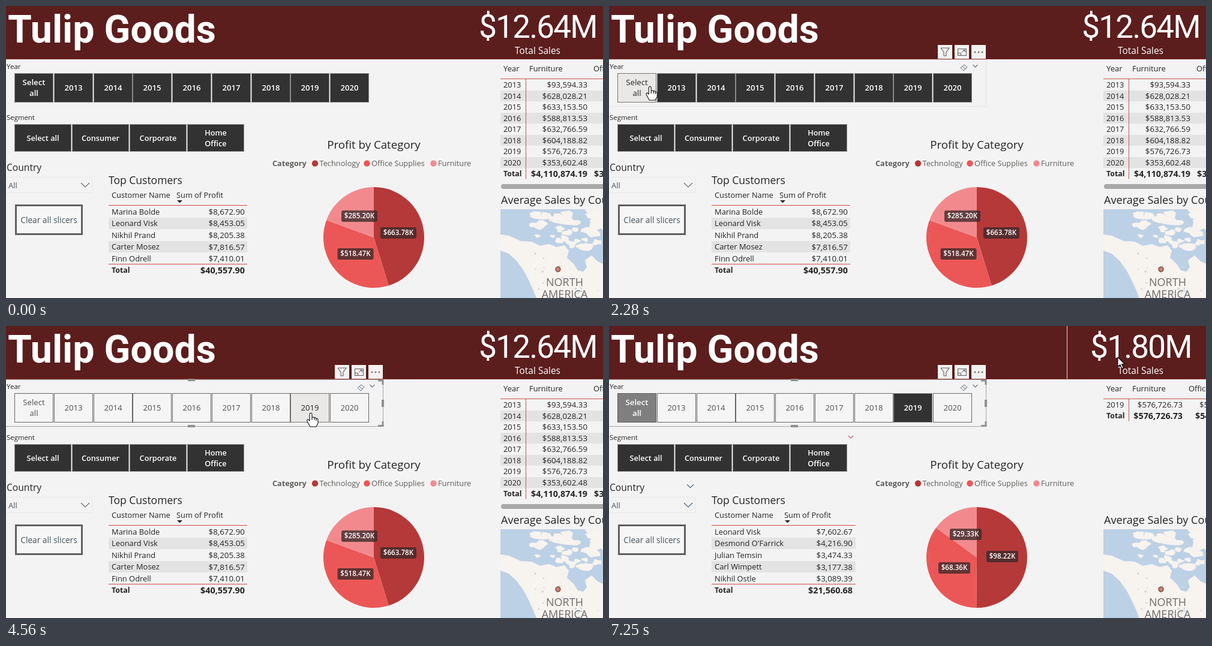
An HTML page with a canvas for the animation above (8000 ms loop, 995 px wide and 487 px high).

```html
<!DOCTYPE html>
<html lang="en">
<head>
<meta charset="utf-8">
<title>Sales dashboard</title>
<style>
html, body { margin: 0; width: 100%; height: 100%; overflow: hidden; background: #f3f3f3; }
canvas { display: block; }
</style>
</head>
<body>
<canvas id="stage" width="995" height="487"></canvas>
<script>
const ctx = document.getElementById('stage').getContext('2d');
const LOOP = 8000, CLEARED = 2950, PICKED = 4840, FILTERED = 5040, SETTLED = 5180;
const RED = '#cf4a42', INK = '#252423', GREY = '#605e5c';
const PIE = ['#b53939', '#eb5757', '#f28a8d'];

const all = {
  card: '$12.64M', sumX: 284, right: 398, edge: 402,
  people: [['Marina Bolde', '$8,672.90'], ['Leonard Visk', '$8,453.05'], ['Nikhil Prand', '$8,205.38'],
    ['Carter Mosez', '$7,816.57'], ['Finn Odrell', '$7,410.01']],
  total: '$40,557.90',
  pie: [663.78, 518.47, 285.2],
  chips: [['$663.78K', 654, 378.5], ['$518.47K', 582.5, 413.5], ['$285.20K', 589, 350.5]],
  years: [['2013', '$93,594.33'], ['2014', '$628,028.21'], ['2015', '$633,153.50'], ['2016', '$588,813.53'],
    ['2017', '$632,766.59'], ['2018', '$604,188.82'], ['2019', '$576,726.73'], ['2020', '$353,602.48']],
  sales: '$4,110,874.19', salesX: 969, nextX: 979, next: ['', '$3']
};
const picked = {
  card: '$1.80M', sumX: 292, right: 406, edge: 411,
  people: [['Leonard Visk', '$7,602.67'], ["Desmond O'Farrick", '$4,216.90'], ['Julian Temsin', '$3,474.33'],
    ['Carl Wimpett', '$3,177.38'], ['Nikhil Ostle', '$3,089.39']],
  total: '$21,560.68',
  pie: [98.22, 68.36, 29.33],
  chips: [['$98.22K', 655.5, 384.5], ['$68.36K', 575.5, 403.5], ['$29.33K', 594.5, 347.5]],
  years: [['2019', '$576,726.73']],
  sales: '$576,726.73', salesX: 956, nextX: 966, next: ['$5', '$54']
};

// Pointer hot spot: time, x, y
const path = [[590, 596, 484], [810, 571, 424], [1100, 520, 320], [1390, 462, 246], [1460, 445, 238],
  [1700, 340, 205], [1940, 236, 173], [2220, 76, 134], [2280, 68, 134], [2430, 108, 136], [2610, 58, 138],
  [3410, 58, 138], [3480, 59, 138], [3750, 250, 190], [3980, 460, 229], [4280, 512, 160],
  [4560, 508, 145], [5110, 506, 145], [6180, 506, 145], [6350, 570, 164], [6600, 720, 110], [6910, 848, 52]];

function pointer(t) {
  const i = path.findIndex(p => p[0] > t);
  if (i === 0) return [-99, -99];
  if (i < 0) return path.at(-1).slice(1);
  const [a, b] = [path[i - 1], path[i]], k = (t - a[0]) / (b[0] - a[0]);
  return [a[1] + (b[1] - a[1]) * k, a[2] + (b[2] - a[2]) * k];
}

const inside = ([x, y], l, t, r, b) => x >= l && x <= r && y >= t && y <= b;

// y is the middle of the capitals
function text(s, x, y, size, color = INK, align = 'left', weight = 400, family = '"Open Sans", "Noto Sans"') {
  ctx.font = `${weight} ${size}px ${family}, sans-serif`;
  ctx.textAlign = align;
  ctx.fillStyle = color;
  ctx.fillText(s, x, y + size * 0.357);
}

function rect(x, y, w, h, color) {
  ctx.fillStyle = color;
  ctx.fillRect(x, y, w, h);
}

function frame(x, y, w, h, color, width = 1) {
  ctx.strokeStyle = color;
  ctx.lineWidth = width;
  ctx.strokeRect(x + width / 2, y + width / 2, w - width, h - width);
}

function line(color, width, ...pts) {
  ctx.strokeStyle = color;
  ctx.lineWidth = width;
  ctx.beginPath();
  for (let i = 0; i < pts.length; i += 2) ctx.lineTo(pts[i], pts[i + 1]);
  ctx.stroke();
}

function dot(x, y, r, color) {
  ctx.fillStyle = color;
  ctx.beginPath();
  ctx.arc(x, y, r, 0, 7);
  ctx.fill();
}

const chevron = (x, y, w, color) => line(color, 1.1, x - w, y - w / 2, x, y + w / 2, x + w, y - w / 2);

function button(label, x, y, w, h, state) {
  const [fill, edge, ink, weight] = {
    on: ['#323232', '#8a8a8a', '#fff', 600],
    part: ['#7f7f7f', '#606060', '#fff', 600],
    off: ['#f5f5f5', '#666', '#4f4f4f', 400],
    hover: ['#e9e8e6', '#777', '#252525', 400]
  }[state];
  rect(x, y, w, h, fill);
  frame(x, y, w, h, edge);
  const rows = label.split('\n'), size = h > 47 ? 13.2 : 12.7;
  rows.forEach((s, i) => text(s, x + w / 2, y + h / 2 + (i - (rows.length - 1) / 2) * 18, size, ink, 'center', weight));
}

function tools(x, y) {
  for (let i = 0; i < 3; i++) rect(x + i * 28, y, 24, 23, '#f3f2f1');
  line(GREY, 1.1, x + 5, y + 5, x + 19, y + 5, x + 14, y + 12, x + 14, y + 18, x + 10, y + 18, x + 10, y + 12, x + 5, y + 5);
  frame(x + 33, y + 6, 15, 12, GREY);
  line(GREY, 1, x + 40, y + 12, x + 46, y + 8);
  line(GREY, 1, x + 42, y + 8.5, x + 45.5, y + 8.5, x + 45.5, y + 12);
  line(GREY, 1, x + 34, y + 13.5, x + 38.5, y + 13.5, x + 38.5, y + 17);
  for (let i = 0; i < 3; i++) dot(x + 62 + i * 6, y + 12, 1.3, GREY);
}

function header(d, p) {
  rect(0, 0, 995, 88, '#5c1d1d');
  rect(0, 88, 995, 1, '#8a3434');
  text('Tulip Goods', 3, 37.8, 64.5, '#fff', 'left', 700, 'Roboto');
  ctx.letterSpacing = '-1.8px';
  text(d.card, 886.5, 34, 53, '#fff', 'center', 400, 'Roboto');
  ctx.letterSpacing = '0px';
  text('Total Sales', 886, 74, 15.5, '#fff', 'center');
  if (inside(p, 763, 0, 995, 88)) rect(763, 0, 1, 88, '#e8dcdc');
}

function yearSlicer(t, p) {
  const selected = t >= CLEARED, hover = inside(p, 0, 89, 628, 167);
  text('Year', 1, 101, 11.6);
  if (selected || hover) {
    frame(-1, 89, 630, 79, selected ? '#a6a6a6' : '#e4e4e4');
    tools(548, 65);
    line('#5f6f80', 1, 586, 103, 592, 98, 597, 102, 591, 108, 586, 103);
    line('#5f6f80', 1, 589, 101, 594, 105);
    chevron(610.5, 100, 4, '#5f6f80');
  }
  if (selected) {
    for (const y of [88, 165]) rect(303, y, 12, 4, '#8f8f8f');
    rect(626, 123, 4, 12, '#8f8f8f');
    line('#8f8f8f', 3, 620, 91, 628, 91, 628, 98);
    line('#8f8f8f', 3, 620, 166.5, 628, 166.5, 628, 159);
  }
  for (let i = 0; i < 9; i++) {
    const x = Math.round(14 + i * 65.75);
    let state = t < CLEARED ? 'on' : 'off';
    if (t >= PICKED && i === 0) state = 'part';
    if (t >= PICKED && i === 7) state = 'on';
    if (inside(p, x, 112, x + 64, 161)) state = 'hover';
    button(i ? String(2012 + i) : 'Select\nall', x, 112, 65, 49, state);
  }
}

function segmentSlicer(t, p) {
  if (inside(p, 0, 168, 421, 245)) {
    frame(-1, 174, 422, 72, '#e6e6e6');
    line(GREY, 1, 349, 168.5, 354, 168.5);
    line(GREY, 1, 373, 168.5, 387, 168.5);
  }
  text('Segment', 1, 186, 11.4);
  ['Select all', 'Consumer', 'Corporate', 'Home\nOffice'].forEach((s, i) => {
    const x = 14 + i * 96;
    button(s, x, 197, 95, 46, inside(p, x, 197, x + 94, 243) ? 'hover' : 'on');
  });
  if (t >= SETTLED) chevron(403, 185, 4, '#cf5068');
}

function countrySlicer(t) {
  const late = t >= SETTLED;
  text('Country', 1, 269, 15.6);
  if (late) chevron(135.5, 267, 5.5, '#4f6478');
  frame(-1, 285, 145, 27, '#e8e8e8');
  text('All', 4, 299, 13, '#4a5560');
  chevron(132, 298.5, 7, late ? '#3f5c78' : '#666');
  rect(15, 331, 113, 51, '#f6f6f6');
  frame(15, 331, 113, 51, '#606060', 3);
  text('Clear all slicers', 71.5, 357.5, 13.7, '#46535e', 'center');
}

function customers(d) {
  text('Top Customers', 171, 291, 17.5);
  text('Customer Name', 176, 315.5, 12.8);
  text('Sum of Profit', d.sumX, 315.5, 12.8);
  ctx.fillStyle = INK;
  ctx.beginPath();
  for (const [x, y] of [[1, 324], [10, 324], [5.5, 328.5]]) ctx.lineTo(d.sumX + x, y);
  ctx.fill();
  d.people.forEach(([name, sum], i) => {
    const y = 343 + i * 19.6;
    if (i % 2) rect(171, Math.round(y - 10), d.edge - 171, 19, '#e3e3e3');
    text(name, 176, y, 12.9);
    text(sum, d.right, y, 13.4, INK, 'right');
  });
  rect(171, 332, d.edge - 171, 1, RED);
  rect(171, 430, d.edge - 171, 1, RED);
  text('Total', 176, 441, 12.4, INK, 'left', 700);
  text(d.total, d.right, 441, 14.4, INK, 'right', 700);
}

function pieChart(d, p) {
  text('Profit by Category', 613, 231.5, 18.7, INK, 'center');
  text('Category', 444, 262.5, 12.7, GREY, 'left', 700);
  [['Technology', 515], ['Office Supplies', 601.5], ['Furniture', 712.5]].forEach(([s, x], i) => {
    dot(x, 262.5, 5.2, PIE[i]);
    text(s, x + 7.5, 262.5, 12.8, GREY);
  });
  const sum = d.pie.reduce((a, b) => a + b);
  let from = -Math.PI / 2;
  d.pie.forEach((v, i) => {
    const to = from + v / sum * 2 * Math.PI;
    ctx.fillStyle = PIE[i];
    ctx.beginPath();
    ctx.moveTo(613, 386);
    ctx.arc(613, 386, 84, from, to);
    ctx.fill();
    from = to;
  });
  for (const [s, x, y] of d.chips) {
    const w = s.length > 7 ? 60 : 53;
    ctx.fillStyle = 'rgba(56,40,40,.76)';
    ctx.beginPath();
    ctx.roundRect(x - w / 2, y - 9.5, w, 19, 3);
    ctx.fill();
    text(s, x, y - .5, 11.6, '#fff', 'center', 600);
  }
  if (inside(p, 440, 224, 817, 487)) tools(737, 226);
}

function salesTable(d) {
  text('Year', 829, 104.5, 13);
  text('Furniture', 872, 104.5, 12.9);
  text('Office Supplies', d.nextX, 104.5, 12.9);
  d.years.forEach(([year, sum], i) => {
    const y = 131.5 + i * 18.5;
    if (i % 2) rect(824, Math.round(y - 9), 171, 18, '#e3e3e3');
    text(year, 829, y, 12.9);
    text(sum, d.salesX, y, 13.3, INK, 'right');
  });
  const y = 131.5 + d.years.length * 18.5;
  text('Total', 829, y, 12.4, INK, 'left', 700);
  text(d.sales, d.salesX, y, 14.3, INK, 'right', 700);
  if (d.next[0]) text(d.next[0], 984, 131.5, 13.3);
  text(d.next[1], d.next[0] ? 977 : 980, y, 14.3, INK, 'left', 700);
  rect(824, 121, 171, 1, '#c4574a');
  rect(866, 122, 1, y - 113, '#c4574a');
  if (d === all) {
    ctx.fillStyle = '#a9a9a9';
    ctx.beginPath();
    ctx.roundRect(825, 297, 190, 8, 4);
    ctx.fill();
  }
}

function land(points) {
  ctx.fillStyle = '#f7f3ee';
  ctx.beginPath();
  for (const [x, y] of points) ctx.lineTo(x, y);
  ctx.fill();
}

function map() {
  text('Average Sales by Country', 825, 324, 18.1);
  ctx.save();
  ctx.beginPath();
  ctx.rect(824, 339, 171, 148);
  ctx.clip();
  rect(824, 339, 171, 148, '#bdd1e6');
  land([[824, 381], [838, 383], [858, 392], [876, 393], [890, 400], [905, 397], [918, 402], [931, 399], [938, 408],
    [935, 420], [946, 430], [953, 441], [962, 443], [968, 436], [965, 424], [976, 416], [986, 426], [995, 430],
    [995, 487], [884, 487], [877, 470], [870, 455], [862, 440], [851, 425], [838, 413], [824, 408]]);
  land([[964, 339], [995, 339], [995, 374], [984, 364], [974, 352]]);
  let seed = 11;
  const rnd = () => (seed = seed * 16807 % 2147483647) / 2147483647;
  for (let i = 0; i < 34; i++) {
    const u = rnd(), x = 878 + u * 108, y = 346 + rnd() * (42 + u * 18), r = 4 + rnd() * 8;
    land(Array.from({ length: 9 }, (_, k) => {
      const q = r * (.55 + rnd() * .6), a = k * Math.PI * 2 / 9;
      return [x + q * 1.2 * Math.cos(a), y + q * .8 * Math.sin(a)];
    }));
  }
  for (let i = 0; i < 22; i++) dot(880 + rnd() * 110, 408 + rnd() * 74, .6 + rnd() * 1.3, '#c9d8e6');
  dot(920, 439, 4.5, '#4a2a24');
  dot(920, 439, 3.4, '#d0806d');
  text('NORTH', 931, 461, 18, '#6c6c6c', 'center');
  text('AMERICA', 931, 481, 18, '#6c6c6c', 'center');
  ctx.restore();
}

const HAND = new Path2D('M-2 2Q0-2 2 2V8Q4 6 6 8Q8 7 9 9Q12 9 12 12V17L9 23H-1L-6 14Q-7 11-4 11L-2 13Z');
const FINGERS = new Path2D('M2 8V12M6 8V12M9 9V13');
const ARROW = new Path2D('M0 0V16L4 12.5L6.8 19L9.3 18L6.5 11.5H11.5Z');

function cursor(p) {
  const overYear = inside(p, 14, 112, 604, 161), overSegment = inside(p, 14, 197, 397, 243);
  const hand = overYear || overSegment;
  ctx.save();
  ctx.translate(...p);
  ctx.fillStyle = '#fff';
  ctx.strokeStyle = '#111';
  ctx.lineWidth = 1.1;
  ctx.lineJoin = 'round';
  ctx.fill(hand ? HAND : ARROW);
  ctx.stroke(hand ? HAND : ARROW);
  if (hand) ctx.stroke(FINGERS);
  ctx.restore();
}

function draw() {
  const t = performance.now() % LOOP, p = pointer(t), d = t < FILTERED ? all : picked;
  rect(0, 0, 995, 487, '#f3f3f3');
  header(d, p);
  segmentSlicer(t, p);
  yearSlicer(t, p);
  countrySlicer(t);
  customers(d);
  pieChart(d, p);
  salesTable(d);
  map();
  cursor(p);
  requestAnimationFrame(draw);
}
draw();
</script>
</body>
</html>
```
